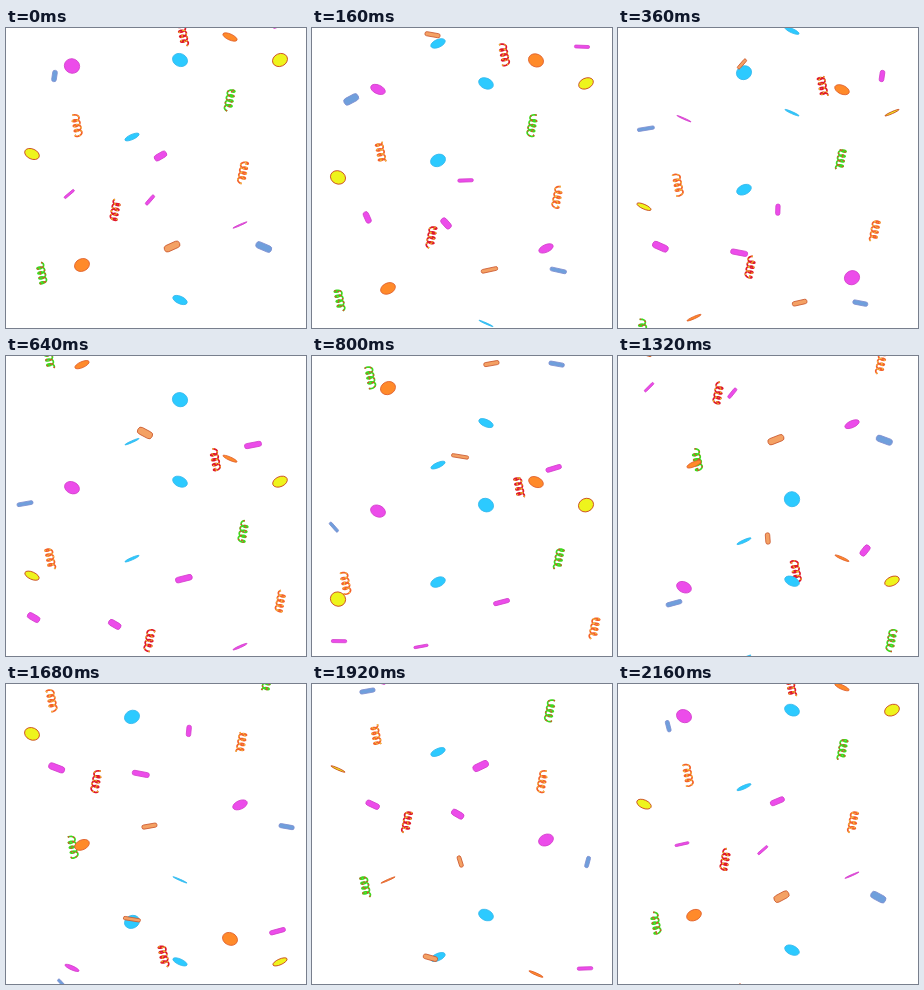
These frames come from a looping animation (300 by 300 pixels, 2200 ms). An HTML page with a canvas:

```html
<!DOCTYPE html>
<html lang="en">
<head>
<meta charset="utf-8">
<title>Confetti</title>
<style>
html, body { margin: 0; width: 100%; height: 100%; overflow: hidden; background: #fff; }
canvas { display: block; width: 300px; height: 300px; }
</style>
</head>
<body>
<canvas id="stage" width="300" height="300"></canvas>
<script>
const ctx = document.getElementById('stage').getContext('2d');
const STEP = 40, STEPS = 55, FALL = 322, SPEED = FALL / STEPS;
const RAD = Math.PI / 180;

const CYAN = ['#2ccaff', '#35b9ee'];
const YELLOW = ['#eef41c', '#c8401c'];
const PINK = ['#ec4cea', '#d440cc'];
const ORANGE = ['#ff8a2a', '#e0602c'];
const BLUE = ['#6f9fdc', '#7f8fd0'];
const TAN = ['#f4a164', '#cc5a30'];
const RED_COIL = ['#e0182c', '#e8c020'];
const GREEN_COIL = ['#3fd81e', '#e8402c'];
const AMBER_COIL = ['#f4622a', '#f0c040'];

// x, starting height, tilt direction, colours
const discs = [
  [174, 32, 1, CYAN], [174, 272, 1, CYAN],
  [126, 109, -1, CYAN], [126, 314, -1, CYAN],
  [26, 126, 1, YELLOW], [274, 32, -1, YELLOW],
  [66, 38, 1, PINK], [234, 197, -1, PINK],
  [76, 237, -1, ORANGE], [224, 9, 1, ORANGE]
];

// x origin, starting height, side, colours
const strips = [
  [0, 48, 1, BLUE], [300, 213, -1, BLUE],
  [134, 123, 1, PINK], [166, 166, -1, PINK],
  [84.5, 160, -1, PINK], [215.5, 317.3, 1, PINK],
  [124, 212.5, 1, TAN], [176, 305.3, -1, TAN]
];

// x origin, starting age in steps, side, colours
const coils = [
  [0, 2, 1, RED_COIL], [300, 30, -1, RED_COIL],
  [430, 13, -1, GREEN_COIL], [-130, 40, 1, GREEN_COIL],
  [-139, 17, 1, AMBER_COIL], [440, 24, -1, AMBER_COIL]
];

const stripX = [[-12, 57], [31, 53.5], [48, 48.5], [77, 37], [89, 31.5], [100, 28],
  [117, 25.5], [123, 20.5], [142, 19], [166, 22], [176, 26], [194, 34],
  [217, 44], [241, 56], [270, 58], [310, 55]];
const stripLag = [[117, 0], [123, 5], [142, 6], [241, 6], [265, 9.5], [294, 6]];

// phase, angle, length, thickness
const tumble = [[0, 45, 13, 3], [6, 50, 13, 4], [14, 90, 12, 5], [28, 130, 13, 7],
  [34, 152, 16, 8], [50, 152, 17, 8], [57, 169, 18, 6], [69, 171, 18, 4],
  [80, 165, 17, 5], [92, 150, 14, 7], [99, 150, 14, 7], [105, 170, 16, 5],
  [111, 170, 17, 4.5], [123, 192, 15, 3], [130, 225, 13, 3]];

const coilX = [[-5, 158], [0, 169], [2, 177], [8, 200], [11, 204.5], [17, 210],
  [22, 207], [27, 197], [30, 191], [38, 170], [44, 157.5], [50, 155]];
const coilY = [[-5, -13], [0, -3], [4, 16], [8, 38], [17, 98], [30, 183], [39, 240], [50, 309]];

const mod = (v, n) => ((v % n) + n) % n;
const wrap = (v, low, span) => low + mod(v - low, span);

function sample(points, at, col = 1) {
  const i = points.findIndex(p => p[0] >= at);
  if (i === 0) return points[0][col];
  if (i < 0) return points[points.length - 1][col];
  const a = points[i - 1], b = points[i];
  return a[col] + (b[col] - a[col]) * (at - a[0]) / (b[0] - a[0]);
}

function place(x, y, angle, draw) {
  ctx.save();
  ctx.translate(x, y);
  ctx.rotate(angle * RAD);
  draw();
  ctx.restore();
}

function paint([fill, edge]) {
  ctx.fillStyle = fill;
  ctx.strokeStyle = edge;
  ctx.lineWidth = 0.8;
  ctx.fill();
  ctx.stroke();
}

function drawDisc([x, start, side, colours], k) {
  const y = wrap(start + k * SPEED, -12, FALL);
  const open = Math.abs(1 - 2 * mod((y - 40) / 103, 1));
  place(x, y, 24 * side, () => {
    ctx.beginPath();
    ctx.ellipse(0, 0, 7.7, Math.max(0.6, 7.5 * open), 0, 0, 2 * Math.PI);
    paint(colours);
  });
}

function drawStrip([x, start, side, colours], k) {
  const n = wrap(start + k * SPEED, -12, FALL);
  const phase = mod(n - 31, 130);
  const [angle, length, thick] = [1, 2, 3].map(c => sample(tumble, phase, c));
  place(x + side * sample(stripX, n), n + sample(stripLag, n), angle * side, () => {
    const w = length - 0.8, h = thick - 0.8;
    ctx.beginPath();
    ctx.roundRect(-w / 2, -h / 2, w, h, [h / 2.2]);
    paint(colours);
  });
}

function drawCoil([x, start, side, [main, spot]], k) {
  const age = wrap(start + k, -5, STEPS);
  place(x + side * sample(coilX, age), sample(coilY, age), -11 * side, () => {
    ctx.scale(side, 1);
    ctx.beginPath();
    for (let i = 0; i <= 64; i++) {
      const a = i / 64 * 8 * Math.PI + age * 0.6;
      ctx.lineTo(3.6 * Math.cos(a), -10 + i / 64 * 20 + 2 * Math.sin(a));
    }
    ctx.lineWidth = 1.7;
    ctx.strokeStyle = main;
    ctx.stroke();
    ctx.setLineDash([1.5, 4]);
    ctx.lineWidth = 1.3;
    ctx.strokeStyle = spot;
    ctx.stroke();
  });
}

const begin = performance.now();
function frame() {
  const k = Math.floor((performance.now() - begin) / STEP) % STEPS;
  ctx.fillStyle = '#fff';
  ctx.fillRect(0, 0, 300, 300);
  coils.forEach(c => drawCoil(c, k));
  discs.forEach(d => drawDisc(d, k));
  strips.forEach(s => drawStrip(s, k));
  requestAnimationFrame(frame);
}
frame();
</script>
</body>
</html>
```
